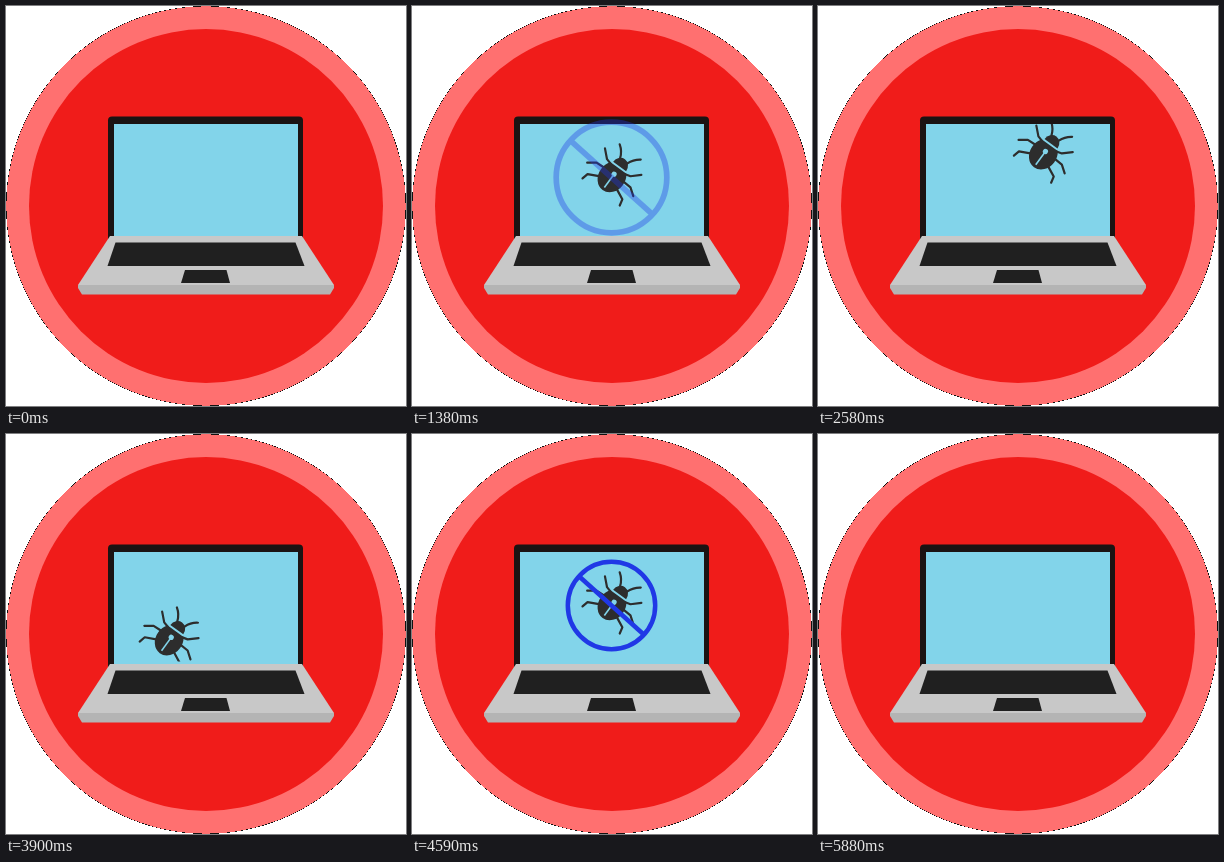
Write an HTML page that moves like this. It is 400 by 400 pixels and loops after 6300 ms.

```html
<!DOCTYPE html>
<html lang="en">
<head>
<meta charset="utf-8">
<title>Laptop bug removal</title>
<style>
  html, body { margin: 0; width: 100%; height: 100%; overflow: hidden; background: #fff; }
  svg { display: block; width: 100vw; height: 100vh; }
</style>
</head>
<body>
<svg viewBox="0 0 400 400">
  <defs>
    <clipPath id="screen"><rect x="107" y="118" width="186" height="109.5"/></clipPath>
    <g id="limbs" fill="none" stroke="#2d2d2d" stroke-width="2.2" stroke-linecap="round" stroke-linejoin="round">
      <path d="M4.5 -20Q7 -27 13 -31"/>
      <path d="M9 -10L14.5 -11.5L22.5 -19"/>
      <path d="M12 -3L21 -2.5L28.5 3"/>
      <path d="M11 7L21.5 12L23 18.5"/>
    </g>
  </defs>

  <g shape-rendering="crispEdges">
    <circle cx="200" cy="200" r="200" fill="#111"/>
    <circle cx="200" cy="200" r="199.6" fill="#ff7070"/>
  </g>
  <circle cx="200" cy="200" r="177" fill="#f01c1a"/>

  <rect x="102" y="110.5" width="195" height="126" rx="4" fill="#1b1313"/>
  <rect x="108" y="118" width="184" height="112" fill="#82d4ea"/>
  <path d="M104 230H296L328 279H72Z" fill="#c8c8c8"/>
  <path d="M72 279H328V282L324 288.5H76L72 282Z" fill="#b4b4b4"/>
  <path d="M109.5 236.5H289.5L298.5 260H101.5Z" fill="#202020"/>
  <path d="M179 264H220.5L224 277H175Z" fill="#202020"/>

  <g clip-path="url(#screen)">
    <g id="bug">
      <use href="#limbs"/>
      <use href="#limbs" transform="scale(-1 1)"/>
      <path d="M-8 -13A8 9 0 0 1 8 -13Z" fill="#2d2d2d"/>
      <path d="M-9.8 -11H9.8A13.5 16 0 1 1 -9.8 -11Z" fill="#2d2d2d"/>
      <path d="M0 -3.5V13" stroke="#82d4ea" stroke-width="1.6"/>
      <circle cy="-3.5" r="2.6" fill="#82d4ea"/>
    </g>
  </g>

  <g id="sign" fill="none" stroke="#2038e6" stroke-width="4.5">
    <circle r="43.7"/>
    <path d="M-43 0H43" transform="rotate(42)"/>
  </g>
</svg>
<script>
  const bug = document.getElementById("bug");
  const sign = document.getElementById("sign");
  const LOOP = 6300, CYCLE = 2940, STEP = 30;

  const progress = (t, start, end) => Math.min(1, Math.max(0, (t - start) / (end - start)));
  const mix = (a, b, p) => a + (b - a) * p;

  function drawBug(t) {
    const enter = progress(t, 570, 1230);
    const leave = progress(t, 2250, CYCLE) ** 1.67;
    const x = mix(110, 200, enter) + 87 * leave;
    const y = mix(257, 171, enter) - 78 * leave;
    bug.setAttribute("visibility", t >= 600 ? "visible" : "hidden");
    bug.setAttribute("transform", `translate(${x} ${y}) rotate(36)`);
  }

  function drawSign(t) {
    const enter = progress(t, 1230, 1650);
    const leave = progress(t, 2250, 2550);
    const scale = 1 + (1 - enter) ** 3 + 0.4 * leave;
    sign.setAttribute("opacity", enter * (1 - leave));
    sign.setAttribute("transform", `translate(199.5 171.5) scale(${scale})`);
  }

  function render(now) {
    const t = Math.floor((now % LOOP) % CYCLE / STEP) * STEP;
    drawBug(t);
    drawSign(t);
  }

  const begin = performance.now();
  function tick() {
    render(performance.now() - begin);
    requestAnimationFrame(tick);
  }
  tick();
</script>
</body>
</html>
```
